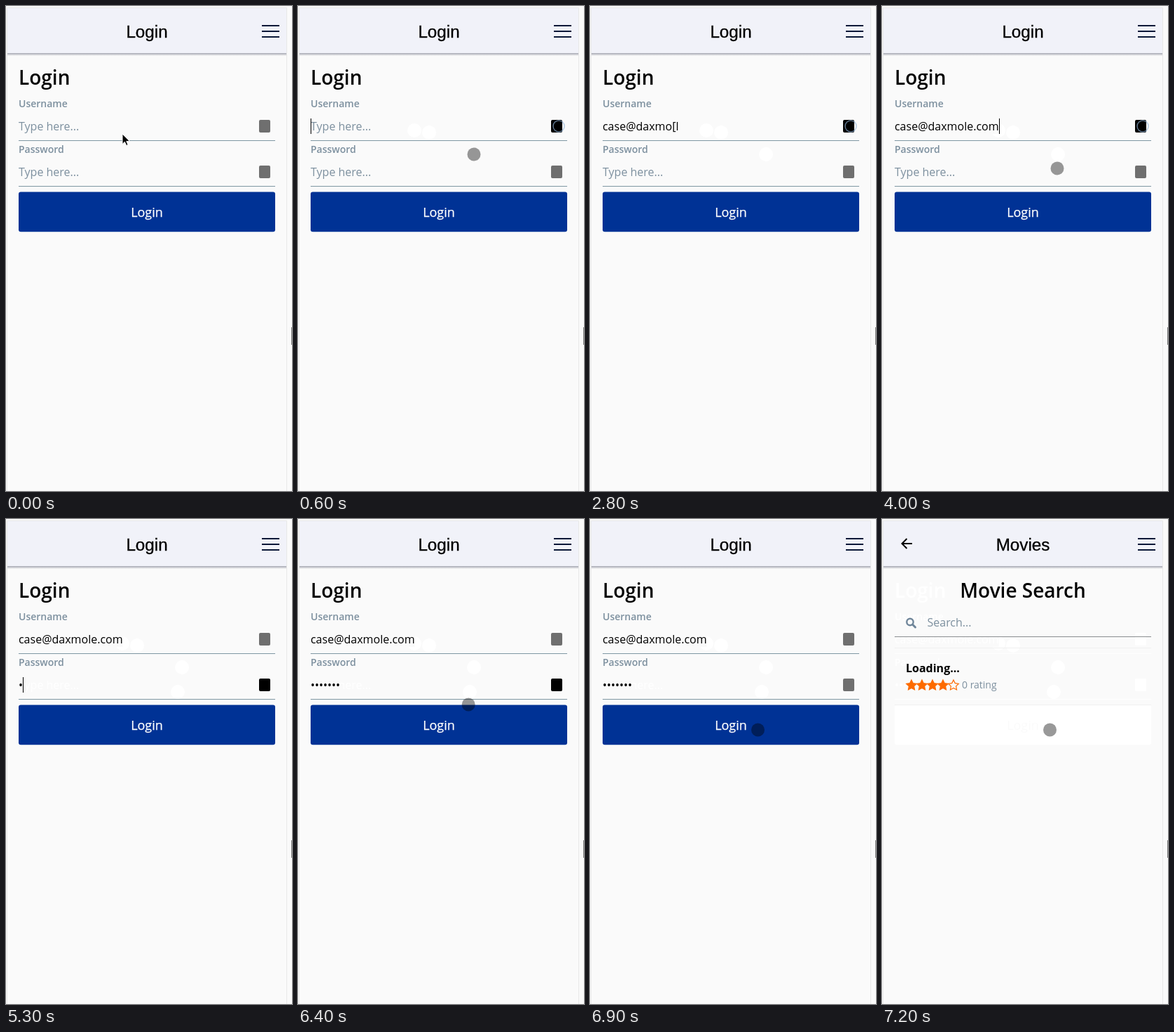
An HTML page that plays this animation: 408 px wide and 690 px high, repeating every 8 s.

```html
<!DOCTYPE html>
<html lang="en">
<head>
<meta charset="utf-8">
<title>Login</title>
<style>
html, body { margin: 0; width: 100%; height: 100%; overflow: hidden; background: #fafafa; }
svg { display: block; width: 408px; height: 690px; }
text { font: 16px "Open Sans", sans-serif; white-space: pre; }
.head { font: 24.2px "Liberation Sans", Arial, sans-serif; text-anchor: middle; stroke: #000; stroke-width: .3; }
.big { font-size: 28px; font-weight: 600; }
.label { font-size: 14px; font-weight: 600; }
.bold { font-weight: 700; }
.small { font-size: 14px; }
.mid { text-anchor: middle; }
.muted { fill: #7d909f; }
.line { fill: #7f97a3; }
.btn { fill: #003295; }
.pressed .btn { fill: #0037be; }
.btnText { font-size: 18px; text-anchor: middle; fill: #fff; stroke: #fff; stroke-width: .25; }
/* pale trace the form leaves behind */
.gone > *, .gone .btn { fill: #fff; }
.gone .btnText { fill: #fafafa; }
#touch { fill: rgba(0, 0, 0, .4); }
#touch.pressed { fill: #71727c; stroke: #e6eaf6; stroke-width: 3; paint-order: stroke; }
</style>
</head>
<body>
<svg>
  <defs>
    <linearGradient id="shade" x2="0" y2="1">
      <stop stop-color="#a3a5b0"/><stop offset="1" stop-color="#fafafa"/>
    </linearGradient>
  </defs>
  <rect width="408" height="690" fill="#fafafa"/>
  <path d="M1.5 690V2.5H400.5V690" fill="none" stroke="#e8e8e8"/>
  <rect x="2" y="67" width="398" height="4" fill="url(#shade)"/>
  <rect x="2" y="3" width="398" height="64" fill="#f1f2f9"/>
  <rect x="407" y="457" width="1" height="25" fill="#777"/>
  <text id="title" class="head" x="201" y="45"></text>
  <path d="M365 28h25M365 36h25M365 44h25" stroke="#0a1838" stroke-width="2"/>

  <g id="traces" fill="#fff"></g>
  <g id="wipes" fill="#fafafa"></g>

  <g id="form">
    <text class="big" x="18" y="112">Login</text>
    <text class="label muted" x="18" y="144">Username</text>
    <text class="label muted" x="18" y="209">Password</text>
    <rect class="line" x="18" y="191" width="366" height="1"/>
    <rect class="line" x="18" y="256" width="366" height="1"/>
    <rect id="icon1" x="361" y="162" width="16" height="18" rx="2"/>
    <rect id="icon2" x="361" y="227" width="16" height="18" rx="2"/>
    <text id="hint1" class="muted" x="18" y="177">Type here...</text>
    <text id="hint2" class="muted" x="18" y="242">Type here...</text>
    <text id="value1" x="18" y="177"></text>
    <text id="value2" x="18" y="242"></text>
    <g id="button">
      <rect id="face" class="btn" x="18" y="264.5" width="366" height="56.7" rx="3"/>
      <text class="btnText" x="201" y="300">Login</text>
    </g>
  </g>
  <circle id="ring" cx="372" cy="171" r="8" fill="none" stroke="#8fb0d6" stroke-opacity=".65" stroke-width="1.5"/>
  <rect id="caret" width="1" height="22"/>

  <g id="movies">
    <path d="M43 35H29M35.5 28l-7 7 7 7" fill="none" stroke="#000" stroke-width="2"/>
    <text class="big mid" x="201" y="112">Movie Search</text>
    <g fill="none" stroke="#70869a">
      <circle cx="40" cy="146.5" r="4.7" stroke-width="2.4"/>
      <path d="M43.5 150l4 4" stroke-width="3" stroke-linecap="round"/>
    </g>
    <text class="muted" x="64.5" y="153">Search...</text>
    <rect x="18" y="167" width="366" height="1" fill="#8a8d90"/>
    <path d="M18 183.5h366M18 264.5h366" stroke="#f0f0f0"/>
    <text class="bold" x="34" y="217.5">Loading...</text>
    <g id="stars" stroke="#fd6b00" stroke-width="1.2"></g>
    <text class="small muted" x="114" y="241">0 rating</text>
  </g>

  <path id="arrow" d="M166 182v14.5l3.4-3.2 2.3 5.2 2.4-1-2.3-5.1h4.6z" stroke="#fff"/>
  <circle id="touch" r="9.5"/>
</svg>
<script>
const LOOP = 8000, TICK = 100, LEFT = 18;
const FIELD_TOP = [160, 225];
const $ = id => document.getElementById(id);
const show = (el, on) => el.style.display = on ? "" : "none";
const clamp = v => Math.max(0, Math.min(1, v));

// One group of keys per tick; an empty group is a pause, "<" deletes
const FIELDS = [
  { start: 1000, focus: 500, keys: "c,a,s,e,,,@,,,,d,,a,x,m,o[,le,,<,<<,,l,e,.,c,om".split(",") },
  { start: 5300, focus: 4300, keys: "•,•,•,•,•,•,,•".split(",") }
];
const PRESS = 6600, DONE = 7100;

// Where the pointer rests: [time, x, y, leaves a trace]
const SPOTS = [
  [100, 166, 177, true], [200, 187, 180, true], [300, 372, 171], [600, 251, 211, true],
  [4000, 250, 231], [4200, 245, 246, true]
];
const TRACES = SPOTS.filter(s => s[3]);

function typed({ start, focus, keys }, t) {
  let value = "", last = focus;
  keys.slice(0, Math.max(0, Math.floor((t - start) / TICK) + 1)).forEach((group, i) => {
    for (const key of group) value = key === "<" ? value.slice(0, -1) : value + key;
    if (group && group[0] !== "<") last = start + i * TICK;
  });
  return { value, blink: (t - last) % 500 < 200 };
}

function pointer(t) {
  const typing = FIELDS.some((f, i) => t >= f.start && t < [4000, 6300][i]);
  if (t < TICK || typing) return null;
  const [, x, y] = SPOTS.filter(s => s[0] <= t).pop();
  const k = clamp((t - 6300) / 300);
  return [x - 5.5 * k, y + 54 * k];
}

function star(x) {
  const points = Array.from({ length: 10 }, (_, i) => {
    const a = i * Math.PI / 5, r = i % 2 ? 3.8 : 7.7;
    return [x + r * Math.sin(a), 236.7 - r * Math.cos(a)].map(v => v.toFixed(2));
  });
  return "M" + points.join("L") + "Z";
}

$("traces").innerHTML = TRACES.map(([, x, y]) => `<circle cx="${x}" cy="${y}" r="10"/>`).join("") +
  FIELD_TOP.map(y => `<text x="${LEFT}" y="${y + 17}">Type here...</text>`).join("");
$("wipes").innerHTML = FIELD_TOP.map(y => `<rect x="${LEFT}" y="${y}" height="22"/>`).join("");
for (let i = 0; i < 5; i++)
  $("stars").innerHTML += `<path d="${star(42 + i * 15)}" fill="${i < 4 ? "#fd6b00" : "none"}"/>`;

function draw(time) {
  const t = Math.floor(time / TICK) * TICK;
  const done = t >= DONE, pressed = t >= PRESS && t < 6900;
  const active = t >= PRESS ? -1 : FIELDS.filter(f => t >= f.focus).length - 1;
  const traces = $("traces").children;

  $("title").textContent = done ? "Movies" : "Login";
  $("form").setAttribute("class", done ? "gone" : "");
  show($("movies"), done);
  show($("caret"), false);
  show($("ring"), active === 0);
  TRACES.forEach(([from], i) => show(traces[i], t > from + TICK));

  FIELDS.forEach((field, i) => {
    const { value, blink } = typed(field, t);
    const text = $("value" + (i + 1));
    text.textContent = value;
    const width = value ? text.getComputedTextLength() : 0;
    show($("hint" + (i + 1)), !value);
    show(traces[TRACES.length + i], value);
    $("wipes").children[i].setAttribute("width", width);
    $("icon" + (i + 1)).setAttribute("fill", active === i ? "#000" : "#6f6f6f");
    if (active === i && blink && t < 6300) {
      show($("caret"), true);
      $("caret").setAttribute("x", LEFT + Math.round(width));
      $("caret").setAttribute("y", FIELD_TOP[i]);
    }
  });

  // Button dims under the press and comes back
  const dim = clamp(Math.min((time - 6550) / 150, (6900 - time) / 150));
  $("face").setAttribute("opacity", 1 - .8 * dim);
  $("button").setAttribute("class", pressed ? "pressed" : "");

  const place = pointer(t), touch = $("touch");
  show($("arrow"), t < TICK);
  show(touch, place);
  touch.setAttribute("class", pressed ? "pressed" : "");
  if (place) {
    touch.setAttribute("cx", place[0]);
    touch.setAttribute("cy", place[1]);
  }
}

function tick() {
  draw(performance.now() % LOOP);
  requestAnimationFrame(tick);
}
tick();
</script>
</body>
</html>
```
